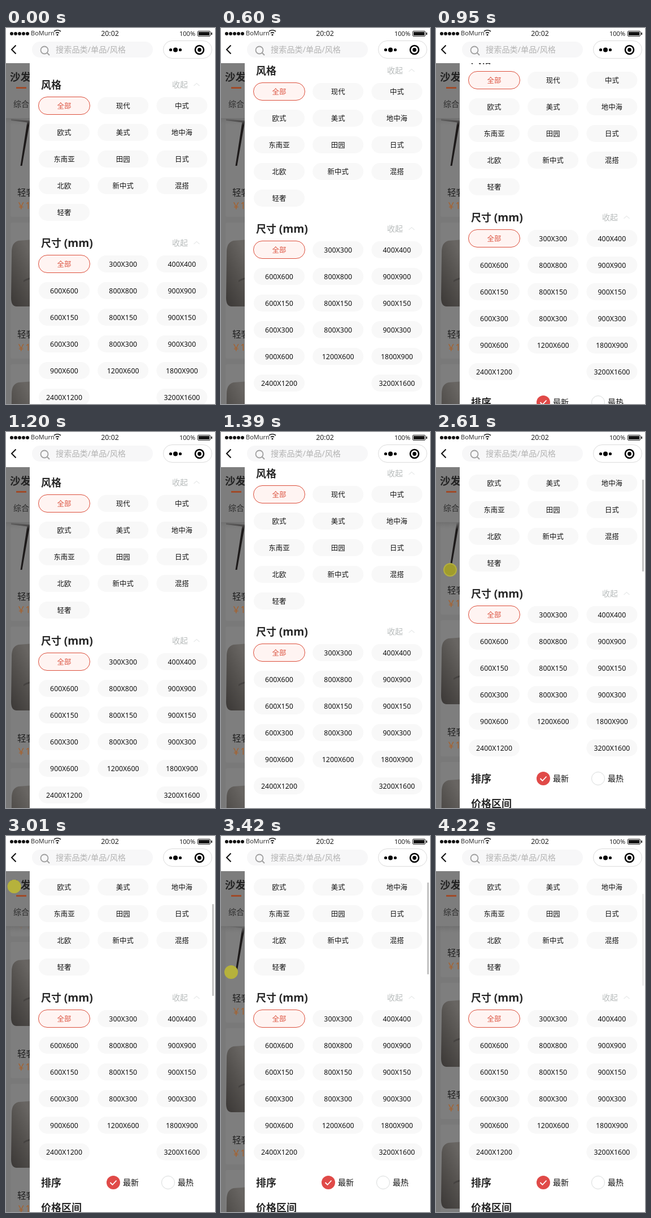
Write an HTML page that moves like this. It is 370 px wide and 663 px high and loops after 5220 ms.

```html
<!DOCTYPE html>
<html lang="zh-CN">
<head>
<meta charset="utf-8">
<style>
html, body { margin: 0; width: 100%; height: 100%; overflow: hidden; background: #fff; }
svg { display: block; }
text { font-family: "Noto Sans", "Noto Sans CJK SC", sans-serif; white-space: pre; }
</style>
</head>
<body>
<svg id="stage" width="370" height="663" viewBox="0 0 370 663"></svg>
<script>
const LOOP = 5220, STEP = 66.6;

// Text whose visual middle sits at y.
const label = (text, x, y, size, fill, extra = '') =>
  `<text x="${x}" y="${y + size * 0.37}" font-size="${size}" fill="${fill}" ${extra}>${text}</text>`;
const title = (text, y) => label(text, 62, y, 18, '#262626', 'font-weight="700"');
const rect = (x, y, w, h, fill, r = 0, extra = '') =>
  `<rect x="${x}" y="${y}" width="${w}" height="${h}" rx="${r}" fill="${fill}" ${extra}/>`;
const dot = (x, y, r, fill, extra = '') =>
  `<circle cx="${x}" cy="${y}" r="${r}" fill="${fill}" ${extra}/>`;
const line = (d, stroke, width) =>
  `<path d="${d}" fill="none" stroke="${stroke}" stroke-width="${width}"/>`;

function pill(text, i, top) {
  if (!text) return '';
  const x = 103 + (i % 3) * 104.2, y = top + Math.floor(i / 3) * 47;
  const box = i === 0
    ? rect(x - 45.5, y - 15.5, 91, 31, '#fff4f2', 15.5, 'stroke="#dc4f3c"')
    : rect(x - 45, y - 15, 90, 30, '#f8f8f8', 15);
  return box + label(text, x, y, 12.4, i ? '#111' : '#dc5340', 'text-anchor="middle"');
}

const section = (name, y, options) =>
  title(name, y) + label('收起', 294, y, 14, '#b7bbbb') +
  line(`M332.5 ${y + 2}l5 -4.5 5 4.5`, '#e8eaea', 1.2) +
  options.split(',').map((text, i) => pill(text, i, y + 37)).join('');

const panel =
  section('风格', 100, '全部,现代,中式,欧式,美式,地中海,东南亚,田园,日式,北欧,新中式,混搭,轻奢') +
  section('尺寸 <tspan font-size="19.4">(mm)</tspan>', 379,
    '全部,300X300,400X400,600X600,800X800,900X900,600X150,800X150,900X150,' +
    '600X300,800X300,900X300,900X600,1200X600,1800X900,2400X1200,,3200X1600') +
  title('排序', 705) + dot(190, 705, 12, '#e04a48') + line('M184.5 705l4 4 7 -7.5', '#fff', 1.8) +
  label('最新', 207, 705, 14, '#111') +
  dot(287, 705, 11.5, '#fff', 'stroke="#d9dcdc"') + label('最热', 304, 705, 14, '#111') +
  title('价格区间', 749);

const table = '<path d="M9 160L50 164V168L9 163ZM37.5 166h4.5L28.5 243h-3Z" fill="#1d1a1a"/>';
const chair = y =>
  `<g transform="translate(0 ${y})">
    <path d="M10 22Q10 5 22 2L50 0V118H18Q9 117 9 103Z" fill="url(#fabric)"/>
    <path d="M31 72Q38 67 50 66V69Q38 70 31 75Z" fill="#454240"/>
  </g>`;
const card = i => {
  const y = 93 + i * 250;
  return rect(8, y, 60, 240, '#7e7e7e', 3) + (i ? chair(y + 30) : table) +
    label('轻奢', 20, y + 197, 15.5, '#1e1e1e') + label('￥1', 19, y + 220, 15.5, '#a8602a');
};

const wifi = [3, 6].map(r => line(`M${91 - r} ${12 - r}q${r} -${r * 0.75} ${2 * r} 0`, '#222', 1.6)).join('') +
  dot(91, 12, 1.6, '#222');

const topBar = rect(0, 0, 370, 62, '#fff') +
  [0, 1, 2, 3, 4].map(i => dot(10 + i * 7, 10, 3, '#111')).join('') +
  label('BoMurn', 44, 9, 11, '#333') + wifi +
  label('20:02', 184, 9, 12.4, '#222', 'text-anchor="middle"') +
  label('100%', 307, 10, 11, '#222') +
  rect(339.5, 5.5, 22, 9, '#fff', 1.5, 'stroke="#222"') + rect(341, 7, 19, 6, '#111') + rect(363, 8, 2, 4, '#222') +
  line('M17.5 30.5l-7.5 7.5 7.5 7.5', '#111', 2) +
  rect(46, 24, 214, 28, '#f7f7f8', 14) +
  dot(68, 39, 6.5, 'none', 'stroke="#a0a0a0" stroke-width="1.8"') + line('M72.5 43.5l4.5 4.5', '#a0a0a0', 2) +
  label('搜索品类/单品/风格', 88, 38, 14.2, '#b3b3b3') +
  rect(278.5, 22.5, 86, 31, '#fff', 15.5, 'stroke="#dcdcdc"') +
  dot(291.5, 38.5, 2.6, '#000') + dot(300, 38.5, 4, '#000') + dot(308.5, 38.5, 2.6, '#000') +
  dot(342.5, 38.5, 7.5, 'none', 'stroke="#000" stroke-width="2.6"') + dot(342.5, 38.5, 3.4, '#000');

document.getElementById('stage').innerHTML = `
  <defs>
    <linearGradient id="fabric" x1=".75" y1="0" x2=".1" y2="1">
      <stop offset=".1" stop-color="#686562"/><stop offset=".5" stop-color="#54514e"/>
      <stop offset="1" stop-color="#3d3a38"/></linearGradient>
    <linearGradient id="shade" x2="0" y2="1"><stop stop-color="#707070"/>
      <stop offset="1" stop-color="#797979" stop-opacity="0"/></linearGradient>
    <clipPath id="content"><rect x="42" y="62" width="328" height="601"/></clipPath>
    <clipPath id="side"><rect y="62" width="42" height="601"/></clipPath>
  </defs>
  <g clip-path="url(#side)">
    ${rect(0, 62, 42, 601, '#797979')}
    <g id="list">${[0, 1, 2, 3].map(card).join('')}</g>
    ${rect(0, 159, 42, 13, 'url(#shade)')}
    ${rect(0, 62, 42, 97, '#7d7d7d')}
    ${label('沙发', 7, 86, 18.5, '#222', 'font-weight="700"')}
    ${rect(18, 104, 18, 3, '#a04a28')}
    ${label('综合', 13, 134, 14, '#2c2c2c')}
  </g>
  ${rect(42, 62, 328, 601, '#fff')}
  <g clip-path="url(#content)"><g id="panel">${panel}</g></g>
  <rect id="bar" x="365" width="3" height="162" rx="1" fill="#c1c1c1"/>
  <circle id="cursor" r="11"/>
  ${topBar}`;

const [list, panelGroup, bar, cursor] = ['list', 'panel', 'bar', 'cursor'].map(id => document.getElementById(id));

// Eased value at a step, from [step, value] pairs.
function track(keys, k) {
  if (k <= keys[0][0]) return keys[0][1];
  const i = keys.findIndex(key => key[0] >= k);
  if (i < 0) return keys[keys.length - 1][1];
  const [k0, a] = keys[i - 1], [k1, b] = keys[i], p = (k - k0) / (k1 - k0);
  return a + (b - a) * p * p * (3 - 2 * p);
}

const panelKeys = [[1, 0], [9, 25], [13, 47], [14, 45], [18, 11], [25, 94]];
const listKeys = [[31, 0], [32, 14], [36, 90], [39, 11], [46, 164], [47, 160], [51, 4], [55, 84]];
const cursorX = [[32, 14], [39, 25], [46, 14], [51, 18]];
const cursorBase = [[39, 254], [46, 244]];

function placeCursor(x, y, fill, ring) {
  const attrs = { cx: x, cy: y, fill, stroke: ring, 'stroke-width': 2 };
  for (const name in attrs) cursor.setAttribute(name, attrs[name]);
}

function draw(time) {
  const k = Math.floor((time % LOOP) / STEP);
  const scroll = track(listKeys, k);
  panelGroup.setAttribute('transform', `translate(0 ${-Math.round(track(panelKeys, k))})`);
  list.setAttribute('transform', `translate(0 ${-Math.round(scroll)})`);

  bar.setAttribute('y', Math.round(81 + scroll / 4));
  bar.setAttribute('opacity', k < 32 ? 0 : k < 61 ? 1 : k < 63 ? 0.6 : 0.3);

  const dragging = k >= 32 && k < 55;
  const resting = k >= 25 && k < 28;
  cursor.setAttribute('opacity', dragging || resting ? 1 : 0);
  if (resting) placeCursor(k < 27 ? 194.5 : 176, k < 27 ? 279.5 : 283, '#8e8e8e', '#bcbcbc');
  if (dragging) {
    placeCursor(track(cursorX, k), track(cursorBase, k) - scroll,
      k < 40 ? '#a09c2c' : '#b6b23c', k < 40 ? '#b3af3e' : '#b6b23c');
  }
}

const start = performance.now();
function tick() {
  draw(performance.now() - start);
  requestAnimationFrame(tick);
}
tick();
</script>
</body>
</html>
```
